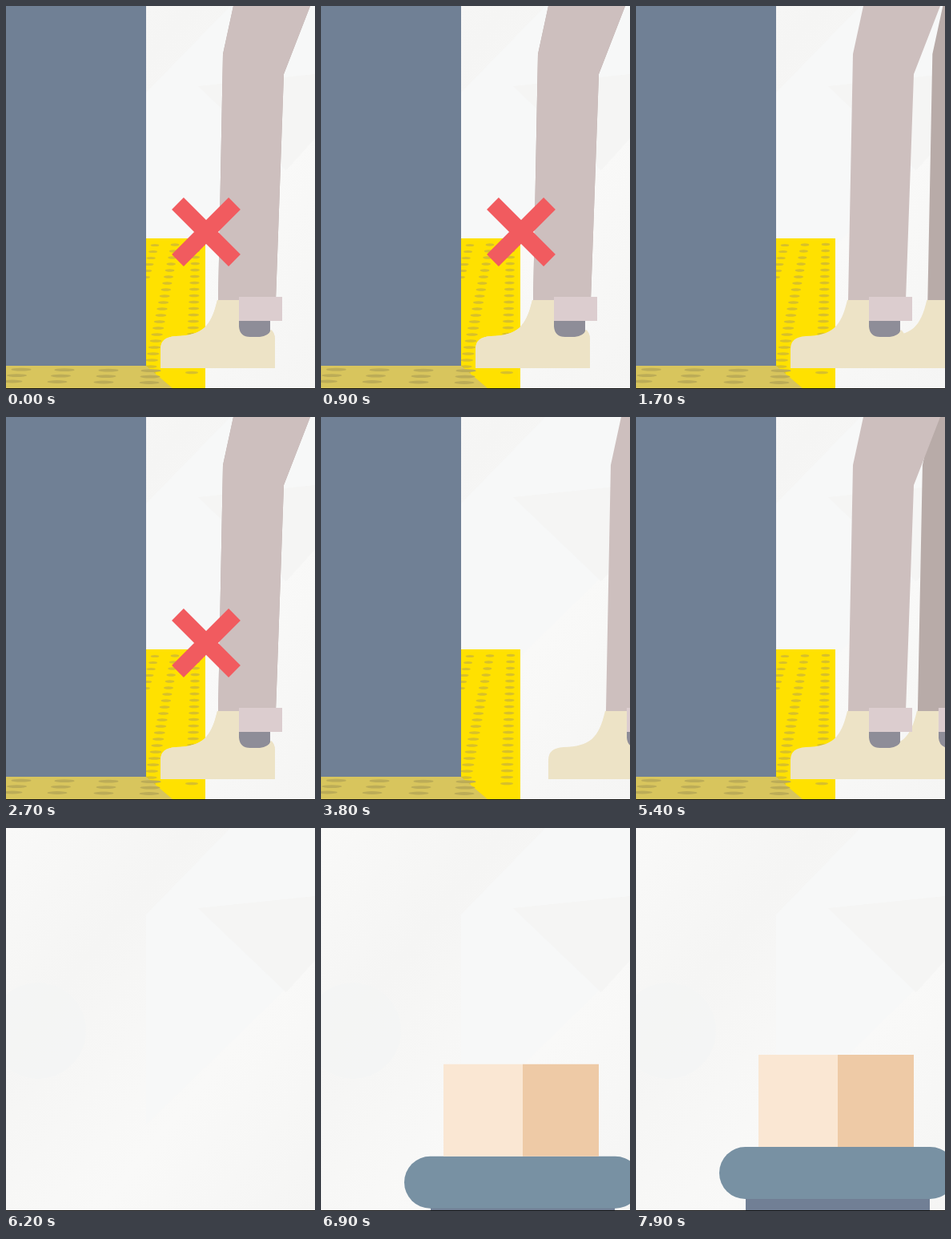
Animation of 386 by 478 pixels, one loop 8 s. Source, as an HTML page:

```html
<!DOCTYPE html>
<html lang="en">
<head>
<meta charset="utf-8">
<style>
html, body { margin: 0; width: 100%; height: 100%; overflow: hidden; background: #f8f8f7; }
svg { display: block; width: 100vw; height: 100vh; }
</style>
</head>
<body>
<svg viewBox="0 0 386 478" preserveAspectRatio="none">
  <defs>
    <linearGradient id="paper" x2="1" y2="1">
      <stop offset="0" stop-color="#f9f9f8"/>
      <stop offset=".3" stop-color="#f5f5f4"/>
      <stop offset=".65" stop-color="#f9f9f8"/>
      <stop offset="1" stop-color="#f5f5f4"/>
    </linearGradient>
    <g id="leg">
      <path d="M284 0H380L347 85L337 367H265L271 60Z"/>
      <path fill="#8e8d98" d="M291 390H330V413H291Z"/>
      <path fill="#ede3c6" d="M264 367H291V400Q292 413 305 413H317Q328 412 331 404Q336 408 336 416V452H193V428Q193 413 212 412C245 411 256 401 264 367Z"/>
      <path fill="#dccdcf" d="M291 363H345V393H291Z"/>
    </g>
  </defs>

  <rect width="386" height="478" fill="url(#paper)"/>
  <path fill="#f7f8f8" d="M280 0H386V165L175 370V108Z"/>
  <path fill="#f5f5f4" d="M240 100L386 85V165L350 205Z"/>
  <circle cx="40" cy="253" r="60" fill="#f4f5f5" opacity=".6"/>

  <g id="scene">
    <path fill="#ffe100" d="M175 290H249V477H175Z"/>
    <g id="panelDots" fill="#d8c02a"></g>
    <path fill="#d8c55d" d="M0 449H175L208 477H0Z"/>
    <g id="floorDots" fill="#bcac57"></g>
    <use id="rear" href="#leg" fill="#b8aba8"/>
    <use id="front" href="#leg" fill="#cdbfbe"/>
    <path fill="#708095" d="M0 0H175V449H0Z"/>
    <path id="cross" d="M-35.5 -35.5L35.5 35.5M35.5 -35.5L-35.5 35.5" stroke="#f15b5f" stroke-width="21"/>
  </g>

  <g id="stand">
    <path fill="#717f95" d="M137 455H367V640H137Z"/>
    <rect x="104" y="398" width="296" height="65" rx="32.5" fill="#7891a3"/>
    <path fill="#fae7d3" d="M153 283H252V398H153Z"/>
    <path fill="#eecaa6" d="M252 283H347V398H252Z"/>
  </g>
  <path fill="#111" d="M0 477H386V478H0Z"/>
</svg>
<script>
const LOOP = 8000, CUT = 6150, OFF = 200;
const el = id => document.getElementById(id);
const clamp = v => Math.max(0, Math.min(1, v));
const progress = (t, start, end) => clamp((t - start) / (end - start));
const easeOut = p => 1 - (1 - p) ** 3;
const easeInOut = p => p * p * (3 - 2 * p);

const dot = (x, y, rx, ry) => `<ellipse cx="${x}" cy="${y}" rx="${rx}" ry="${ry}"/>`;

function drawDots() {
  let panel = '', floor = '';
  for (let i = 0; i < 21; i++) {
    const y = 297.5 + i * 8, rx = 5.3 + i * 0.14;
    panel += dot(237 - i * 0.25, y, rx, 1.7);
    panel += dot(211 - i * 1.6, y + 0.5, rx, 1.7);
    if (i < 6) panel += dot(186 - i * 2.4, y + 1, rx, 1.6);
  }
  for (let row = 0; row < 3; row++) {
    [19, 73, 128, 181].forEach((x, col) => {
      const shift = [5.5, 4.5, 3, 1][col];
      floor += dot(x - row * shift, 453.7 + row * 7.4 + col * 0.5, 12.5, 1.9);
    });
  }
  el('panelDots').innerHTML = panel;
  el('floorDots').innerHTML = floor;
}

// Each walk: time the stage clears, span of each leg's slide, span of the cross.
const walks = [
  { start: -3000, front: [-2900, -2400], rear: [-1500, -900], cross: [-700, 980] },
  { start: 980, front: [980, 1450], rear: [1480, 1920], cross: [2150, 3520] },
  { start: 3520, front: [3520, 4050], rear: [5140, 5620], cross: [5700, CUT] }
];

const slide = (t, [start, end]) => OFF * (1 - easeInOut(progress(t, start, end)));

function render(t) {
  const walk = walks.filter(w => t >= w.start).pop();
  const [on, off] = walk.cross;
  const shown = t >= on && t < off;
  const scale = shown ? easeOut(progress(t, on - 60, on + 160)) : 0;

  el('scene').style.display = t < CUT ? '' : 'none';
  el('front').setAttribute('transform', `translate(${slide(t, walk.front)} 0)`);
  el('rear').setAttribute('transform', `translate(${slide(t, walk.rear)} 0)`);
  el('cross').style.display = shown ? '' : 'none';
  el('cross').setAttribute('transform', `translate(250 282) scale(${scale})`);

  const rise = 200 * (1 - easeOut(progress(t, 6350, 7250)));
  el('stand').style.display = t >= 6350 ? '' : 'none';
  el('stand').setAttribute('transform', `translate(0 ${rise})`);
}

drawDots();
const begin = performance.now();
function tick() {
  render((performance.now() - begin) % LOOP);
  requestAnimationFrame(tick);
}
tick();
</script>
</body>
</html>
```
